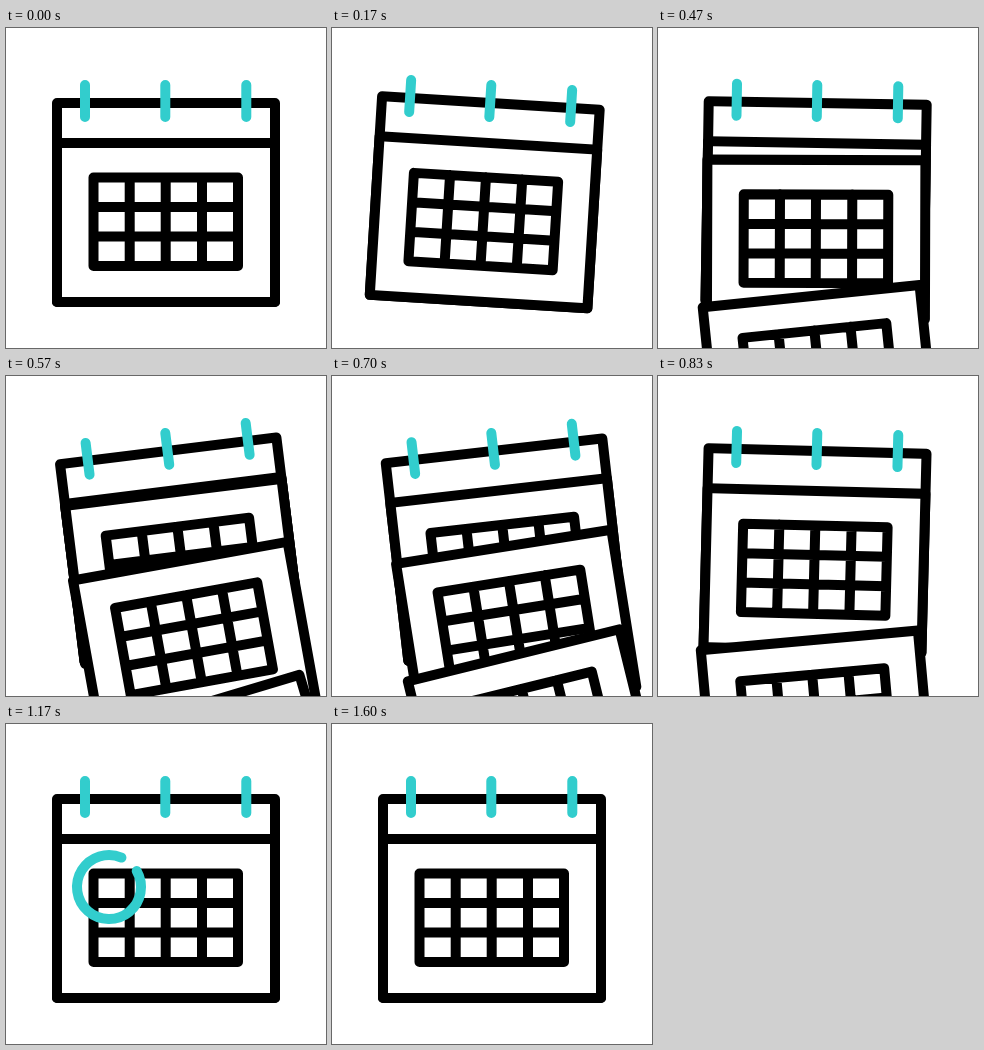
Write an HTML page that moves like this. It is 320x320 px and loops after 1670 ms.

```html
<!DOCTYPE html>
<html lang="en">
<head>
<meta charset="utf-8">
<title>Calendar</title>
<style>
  html, body { margin: 0; width: 100%; height: 100%; overflow: hidden; background: #fff; }
  svg { display: block; width: 100%; height: 100%; }
</style>
</head>
<body>
<svg viewBox="0 0 320 320" fill="none" stroke-width="10" stroke-linecap="round" stroke-linejoin="round">
  <defs>
    <g id="sheet" stroke="#000">
      <path fill="#fff" d="M51 115H269V274H51Z"/>
      <path d="M87.5 149.5H232V238H87.5ZM123.7 149.5V238M159.7 149.5V238M196 149.5V238M87.5 179H232M87.5 208.5H232"/>
    </g>
  </defs>
  <g id="calendar">
    <path stroke="#000" fill="#fff" d="M51 75H269V274H51Z"/>
    <use href="#sheet"/>
    <g id="pages"></g>
    <path stroke="#32cdcd" d="M79 57V89M159.3 57V89M240.3 57V89"/>
    <path id="mark" stroke="#32cdcd"/>
  </g>
</svg>
<script>
const LOOP = 1670, STEP = 100 / 3;
const FALL = 520, DROP = 250;
const starts = [540, 384, 168];   // back to front
const swing = [[70, 0], [315, 10.3], [620, -8.6], [950, 5.5], [1150, 0]];

const calendar = document.getElementById('calendar');
const mark = document.getElementById('mark');
const pages = starts.map(start => {
  const el = document.createElementNS('http://www.w3.org/2000/svg', 'use');
  el.setAttribute('href', '#sheet');
  document.getElementById('pages').append(el);
  return { el, start };
});

function ease(t, from, to) {
  const s = Math.min(1, Math.max(0, (t - from) / (to - from)));
  return s * s * (3 - 2 * s);
}

function swingAngle(t) {
  let angle = 0;
  for (let i = 1; i < swing.length; i++) {
    const [t0, a0] = swing[i - 1], [t1, a1] = swing[i];
    angle += (a1 - a0) * ease(t, t0, t1);
  }
  return angle;
}

// Clockwise arc, given as fractions of a turn
function arc(from, to) {
  if (to - from < 0.004) return '';
  const point = f => {
    const a = (f * 360 - 30) * Math.PI / 180;
    return `${103 + 32 * Math.cos(a)} ${163 + 32 * Math.sin(a)}`;
  };
  const mid = (from + to) / 2;
  return `M${point(from)}A32 32 0 0 1 ${point(mid)}A32 32 0 0 1 ${point(to)}`;
}

function draw(t) {
  calendar.setAttribute('transform', `rotate(${swingAngle(t)} 159.5 57)`);
  for (const { el, start } of pages) {
    const d = DROP * ease(t, start, start + FALL);
    el.setAttribute('display', d > 0 ? 'inline' : 'none');
    el.setAttribute('transform', `translate(${d * 0.039} ${d}) rotate(${-d * 0.0445} 160 194.5)`);
  }
  mark.setAttribute('d', arc(ease(t, 1320, 1600), ease(t, 960, 1218)));
}

const begin = performance.now();
function tick() {
  const t = (performance.now() - begin) % LOOP;
  draw(Math.floor((t + 3.4) / STEP) * STEP);   // runs at 30 pictures a second
  requestAnimationFrame(tick);
}
tick();
</script>
</body>
</html>
```
